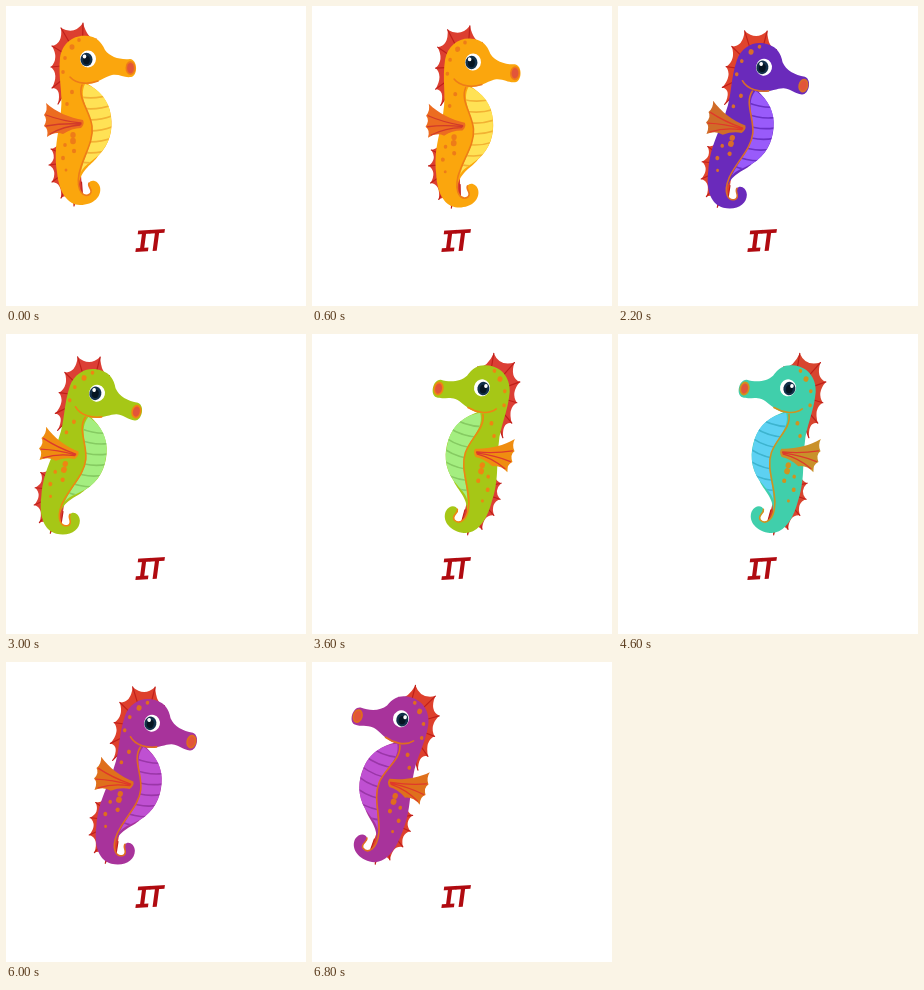
An HTML page with a canvas for the animation above (7000 ms loop, 300x300 px).

```html
<!DOCTYPE html>
<html>
<head>
<meta charset="utf-8">
<style>
html, body { margin: 0; width: 100%; height: 100%; overflow: hidden; background: #fff; }
canvas { display: block; }
</style>
</head>
<body>
<canvas id="stage" width="300" height="300"></canvas>
<script>
const ctx = document.getElementById('stage').getContext('2d');
const STEP = 200;
const EYE = [81, 53];

// Each skin is used for one sweep through the poses.
const skins = [
  { body: '#fba60d', edge: '#ee7c18', belly: '#ffe255', stripe: '#f2b233', fin: '#ec6c20', ray: '#d23a2a', crest: '#dc3f30' },
  { body: '#6a2abb', edge: '#d86d2a', belly: '#995bfa', stripe: '#6a2fc6', fin: '#d06c28', ray: '#e0382a', crest: '#e0442c' },
  { body: '#a6c716', edge: '#ef8512', belly: '#a4ee80', stripe: '#86cb62', fin: '#ef8d10', ray: '#dc3a2c', crest: '#dc3f35' },
  { body: '#40cfab', edge: '#cf931f', belly: '#5dd1f2', stripe: '#3db4cf', fin: '#c9912a', ray: '#dc3a2c', crest: '#d8452f' },
  { body: '#a8339b', edge: '#e06c1e', belly: '#bf50d2', stripe: '#9a36a8', fin: '#df701c', ray: '#e0382a', crest: '#de402c' }
];

// Eye position, facing (1 = right) and tilt in degrees.
const poses = [
  [81, 53, 1, 0],
  [90, 59, 1, 13],
  [145, 61, 1, 13],
  [160, 56, 1, 3],
  [171, 54, -1, -11],
  [130, 55, -1, -13],
  [90, 57, -1, -15.5]
];

const body = new Path2D(`M82 30C68 28 56 37 54 52C52 72 57 88 55 104C54 124 47 140 51 166
  C53 187 62 199 74 199C88 199 96 190 94 181C92 174 85 173 83 177C81 181 88 184 84 188
  C79 192 72 186 73 178C75 163 87 158 92 150C104 138 107 124 105 110C103 94 92 84 82 78
  C92 77 100 70 106 69C114 68 118 72 125 71C132 70 132 54 124 53C114 54 104 51 99 44C95 35 90 31 82 30Z`);
const belly = new Path2D(`M79 78C92 82 104 94 105 112C107 130 100 144 88 153C82 158 78 160 75 166
  C78 150 88 136 86 120C84 105 72 92 79 78Z`);
const seam = new Path2D(`M64 71C71 79 84 78 92 75M76 79C71 92 84 105 86 120C88 136 77 150 73 168
  C70 186 78 192 84 188C88 184 81 181 83 177`);
const fin = new Path2D(`M77 114C64 112 50 106 40 97Q42 104 38 109Q42 113 38 120Q43 123 41 131
  Q49 125 57 128Q66 122 75 122Q79 118 77 114Z`);
const rays = new Path2D('M75 117Q56 115 40 109M75 118Q56 117 40 120M74 119Q58 120 44 128');
const stripes = new Path2D([91, 102, 113, 124, 135, 146, 156]
  .map(y => `M74 ${y}Q92 ${y + 3} 108 ${y - 4}`).join(''));

const upperTips = [[90, 33], [77, 17], [55, 22], [46, 40], [45, 61], [46, 82], [52, 98]];
const lowerTips = [[54, 128], [45, 143], [43, 159], [46, 176], [55, 192], [68, 200], [77, 197]];
const spots = [[66, 41, 2.8], [73, 34, 2], [59, 52, 2], [57, 66, 2], [66, 86, 2.2], [61, 98, 2],
  [67, 129, 3], [67, 135, 3.2], [59, 139, 2], [68, 145, 2.3], [57, 152, 2.2], [60, 164, 1.6]];

function disc(x, y, rx, ry, color) {
  ctx.fillStyle = color;
  ctx.beginPath();
  ctx.ellipse(x, y, rx, ry, 0, 0, Math.PI * 2);
  ctx.fill();
}

function fill(path, color) {
  ctx.fillStyle = color;
  ctx.fill(path);
}

function line(path, color, width) {
  ctx.strokeStyle = color;
  ctx.lineWidth = width;
  ctx.stroke(path);
}

// Spiky membrane with hollow edges between its tips.
function frill(tips, cx, cy, color) {
  const edge = new Path2D(), ribs = new Path2D();
  edge.moveTo(cx, cy);
  tips.forEach(([x, y], i) => {
    if (i) {
      const mx = (x + tips[i - 1][0]) / 2, my = (y + tips[i - 1][1]) / 2;
      edge.quadraticCurveTo(mx + (cx - mx) * .25, my + (cy - my) * .25, x, y);
    } else edge.lineTo(x, y);
    ribs.moveTo(x, y);
    ribs.lineTo(x + (cx - x) * .5, y + (cy - y) * .5);
  });
  edge.closePath();
  fill(edge, color);
  line(ribs, '#c01f1a', 1.2);
}

function seahorse(skin, [x, y, facing, tilt]) {
  ctx.save();
  ctx.translate(x, y);
  ctx.scale(facing, 1);
  ctx.rotate(tilt * Math.PI / 180);
  ctx.translate(-EYE[0], -EYE[1]);
  ctx.lineCap = 'round';

  frill(upperTips, 76, 58, skin.crest);
  frill(lowerTips, 74, 155, skin.crest);
  fill(body, skin.body);

  fill(belly, skin.belly);
  ctx.save();
  ctx.clip(belly);
  line(stripes, skin.stripe, 1.6);
  ctx.restore();
  line(seam, skin.edge, 1.6);

  for (const [sx, sy, r] of spots) disc(sx, sy, r * .9, r, skin.edge);
  fill(fin, skin.fin);
  line(rays, skin.ray, 1.3);

  disc(124.5, 62, 5, 7, skin.edge);
  disc(124.5, 62, 3.4, 5.2, '#e2553a');
  disc(82, 53, 8, 8.5, '#fff');
  disc(80.5, 53.5, 6, 6.8, '#12304a');
  disc(80.5, 54, 3.4, 4.2, '#061522');
  disc(78.5, 50.5, 1.8, 2, '#fff');
  ctx.restore();
}

function caption() {
  ctx.save();
  ctx.translate(129, 246);
  ctx.rotate(-.06);
  ctx.font = 'italic bold 29px "DejaVu Sans Mono", monospace';
  ctx.fillStyle = '#b00a10';
  ctx.letterSpacing = '-4.5px';
  ctx.fillText('IT', 0, 0);
  ctx.restore();
}

function draw() {
  const n = poses.length;
  const step = Math.floor(performance.now() / STEP) % (n * skins.length);
  const sweep = Math.floor(step / n), k = step % n;
  ctx.fillStyle = '#fff';
  ctx.fillRect(0, 0, 300, 300);
  // Odd sweeps run backwards.
  seahorse(skins[sweep], poses[sweep % 2 ? n - 1 - k : k]);
  caption();
  requestAnimationFrame(draw);
}
draw();
</script>
</body>
</html>
```
